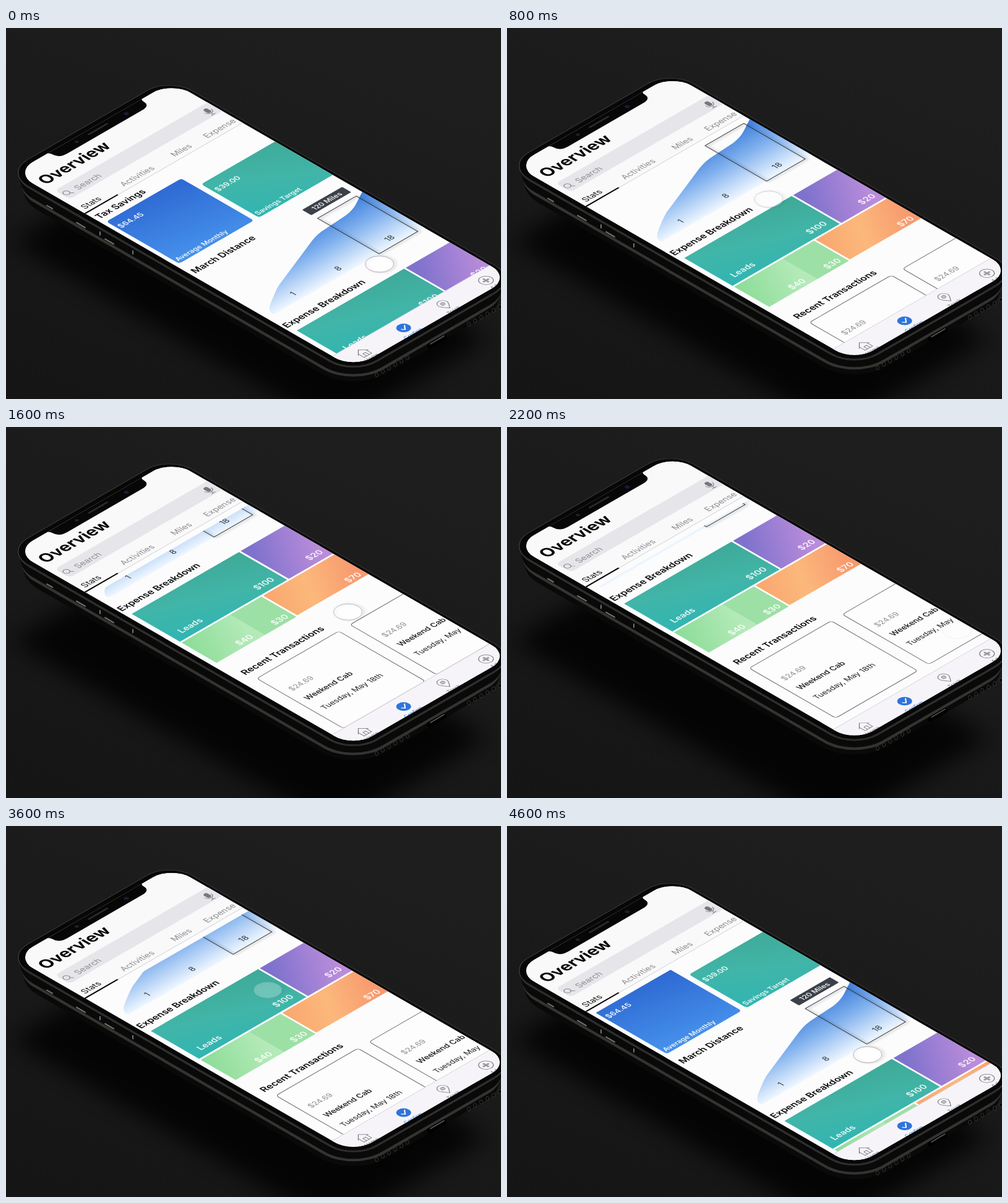
Recreate the animation shown at these times as an HTML page. Size 800 px wide and 600 px high, loop 4700 ms.

```html
<!DOCTYPE html>
<html lang="en">
<head>
<meta charset="utf-8">
<title>Overview screen</title>
<style>
  html, body { margin: 0; width: 100%; height: 100%; overflow: hidden; background: #1b1b1b; }
  svg { display: block; width: 800px; height: 600px; font-family: Inter, "Liberation Sans", sans-serif; }
  .head { font-size: 19.4px; font-weight: 600; fill: #0c0c0e; }
  .tab { font-size: 17.5px; fill: #8b8b90; }
  .money { font-size: 18px; font-weight: 600; fill: #fff; fill-opacity: .9; }
  .card { font-size: 14.8px; font-weight: 600; fill: #fff; fill-opacity: .9; }
  .sum { font-size: 16px; }
  .axis { font-size: 17px; fill: #30343a; text-anchor: middle; }
  .mid { text-anchor: middle; }
  .icon { fill: none; stroke: #77777c; stroke-width: 1.3; stroke-linejoin: round; stroke-linecap: round; }
  .label { font-size: 11px; fill: #66666b; text-anchor: middle; }
</style>
</head>
<body>
<svg viewBox="0 0 800 600">
  <defs>
    <linearGradient id="desk" x1="0" y1="1" x2=".5" y2="0">
      <stop offset="0" stop-color="#151515"/><stop offset=".5" stop-color="#191919"/><stop offset="1" stop-color="#1e1e1e"/>
    </linearGradient>
    <linearGradient id="blue" x1=".6" y1="0" x2=".4" y2="1">
      <stop offset="0" stop-color="#2f6bd4"/><stop offset="1" stop-color="#4590ea"/>
    </linearGradient>
    <linearGradient id="teal" x1="0" y1="1" x2="1" y2="0">
      <stop offset="0" stop-color="#30b5b2"/><stop offset=".5" stop-color="#41b5a8"/><stop offset="1" stop-color="#3fa998"/>
    </linearGradient>
    <linearGradient id="purple" x1="0" y1=".3" x2=".8" y2=".9">
      <stop offset="0" stop-color="#7f72cd"/><stop offset="1" stop-color="#ba8cda"/>
    </linearGradient>
    <linearGradient id="orange" x1="0" y1=".2" x2="1" y2=".5">
      <stop offset="0" stop-color="#f9a870"/><stop offset=".45" stop-color="#fcb87b"/><stop offset="1" stop-color="#f79a6f"/>
    </linearGradient>
    <linearGradient id="green" x1="0" y1="0" x2="1" y2=".4">
      <stop offset="0" stop-color="#8bdc97"/><stop offset="1" stop-color="#b4eab8"/>
    </linearGradient>
    <linearGradient id="area" gradientUnits="userSpaceOnUse" x1="0" y1="462" x2="0" y2="608">
      <stop offset="0" stop-color="#3f7fdc"/><stop offset=".45" stop-color="#82b2ee"/><stop offset="1" stop-color="#eff7ff"/>
    </linearGradient>
    <clipPath id="glass"><rect width="379" height="816" rx="46"/></clipPath>
    <clipPath id="view"><rect y="185" width="379" height="580"/></clipPath>
    <filter id="blur" x="-30%" y="-30%" width="160%" height="160%"><feGaussianBlur stdDeviation="26"/></filter>
    <filter id="soft" x="-30%" y="-30%" width="160%" height="160%"><feGaussianBlur stdDeviation="2.5"/></filter>
    <g id="transaction">
      <rect x="27" y="954" width="197" height="208" rx="6" fill="#fdfdfd" stroke="#77777b" stroke-width="1.6"/>
      <text x="43" y="1023" font-size="16" fill="#8e8e93">$24.69</text>
      <text x="43" y="1061" font-size="16.5" font-weight="500" fill="#111">Weekend Cab</text>
      <text x="43" y="1101" font-size="16.3" fill="#222">Tuesday, May 18th</text>
    </g>
    <g id="grille" fill="#050505" stroke="#3a3a38"></g>
  </defs>

  <rect width="800" height="600" fill="url(#desk)"/>
  <rect transform="matrix(.672 -.388 .672 .388 6 346)" width="375" height="780" rx="50" opacity=".8" filter="url(#blur)"/>

  <g id="phone">
    <g id="body"></g>
    <g id="buttons" stroke="#77766f" stroke-width="2" stroke-linecap="round"></g>
    <use href="#grille" x="599" y="561"/>
    <use href="#grille" x="748" y="479"/>
    <path d="M684 514L708 500" stroke="#000" stroke-width="8" stroke-linecap="round"/>
    <path d="M686 511L708 498" stroke="#5c5b56" stroke-width="1.5" stroke-linecap="round"/>

    <g transform="matrix(.672 -.388 .672 .388 13 234)">
      <rect x="-11" y="-11" width="396" height="838" rx="55" fill="#070707" stroke="#414141" stroke-width="1.3"/>
      <g clip-path="url(#glass)">
        <rect width="379" height="816" fill="#fcfcfd"/>
        <rect width="379" height="171" fill="#f9f9fa"/>
        <path d="M0 171H379" stroke="#c9c9ce"/>
        <path d="M0 170.500H79" stroke="#000" stroke-width="3"/>

        <g clip-path="url(#view)">
          <g id="content">
            <text class="head" x="6" y="200">Tax Savings</text>
            <rect x="9" y="213" width="180" height="175" rx="6" fill="url(#blue)"/>
            <text class="card sum" x="13" y="245">$64.45</text>
            <text class="card" x="13" y="382">Average Monthly</text>
            <rect x="201" y="249" width="200" height="139" rx="6" fill="url(#teal)"/>
            <text class="card sum" x="206" y="285">$39.00</text>
            <text class="card" x="205" y="382">Savings Target</text>

            <text class="head" x="8" y="428.500">March Distance</text>
            <path fill="url(#area)" d="M18 608C14 599 24 589 36 581C52 571 66 562 84 553L212 502Q232 494 250 492L310 488Q330 485 345 477L380 458V608Z"/>
            <rect x="272" y="463" width="93" height="148" fill="none" stroke="#000" stroke-opacity=".16" stroke-width="4" filter="url(#soft)"/>
            <rect x="270" y="460" width="93" height="148" fill="none" stroke="#26282c" stroke-width="1.3"/>
            <rect x="269" y="424" width="96" height="22" rx="2" fill="#3b4149"/>
            <text class="card mid" x="317" y="440.500">120 Miles</text>
            <text class="axis" x="83" y="594">1</text>
            <text class="axis" x="190" y="595">8</text>
            <text class="axis" x="315" y="594">18</text>

            <text class="head" x="4" y="652.500">Expense Breakdown</text>
            <rect x="11" y="669" width="258" height="116" fill="url(#teal)"/>
            <rect x="273" y="669" width="110" height="116" fill="url(#purple)"/>
            <rect x="11" y="789" width="116" height="84" fill="url(#green)"/>
            <rect x="127" y="789" width="76" height="84" fill="#9de0a6"/>
            <rect x="207" y="789" width="176" height="82" fill="url(#orange)"/>
            <g class="money mid">
              <text x="57" y="770">Leads</text>
              <text x="233" y="771">$100</text>
              <text x="353" y="772">$20</text>
              <text x="92" y="865">$40</text>
              <text x="177" y="865">$30</text>
              <text x="353" y="865">$70</text>
            </g>

            <text class="head" x="20" y="933.500">Recent Transactions</text>
            <use href="#transaction"/>
            <use href="#transaction" x="224"/>
          </g>
        </g>

        <text x="13" y="64" font-size="34" font-weight="700" fill="#060607">Overview</text>
        <rect x="12" y="86" width="380" height="36" rx="9" fill="#e6e5ea"/>
        <g class="icon">
          <circle cx="21" cy="105" r="6"/><path d="M25.500 109.500L30 114"/>
        </g>
        <text class="tab" x="41" y="113.500">Search</text>
        <rect x="357" y="96" width="9" height="15" rx="4.500" fill="#77777c"/>
        <path class="icon" d="M353.500 105a8 8 0 0 0 16 0M361.500 113v5M357 118h9"/>
        <text class="tab" x="9" y="161.500" style="fill:#111">Stats</text>
        <text class="tab" x="103" y="161.500">Activities</text>
        <text class="tab" x="226" y="160.500">Miles</text>
        <text class="tab" x="304" y="161">Expense</text>

        <rect y="765" width="379" height="51" fill="#f6f4f9"/>
        <path d="M0 765H379" stroke="#cfced4"/>
        <path class="icon" d="M33 795L45 783L57 795M36 793V806H54V793M42 806V797H48V806"/>
        <circle cx="145" cy="792" r="12.600" fill="#2f74dc"/>
        <path d="M139 792L143.500 797L152 787" fill="none" stroke="#fff" stroke-width="2.200"/>
        <path class="icon" d="M242 806C236 798 232 794 232 789a10 10 0 0 1 20 0C252 794 248 798 242 806Z"/>
        <circle cx="242" cy="789" r="4" fill="#c6c6ca" stroke="#77777c"/>
        <circle class="icon" cx="343" cy="792" r="12.600"/>
        <path d="M336 792H350M343 785V799" stroke="#9a9a9f" stroke-width="4"/>
        <text class="label" x="45" y="819">Home</text>
        <text class="label" x="145" y="819" style="fill:#2f74dc">Confirm</text>
        <text class="label" x="242" y="819">Track</text>
        <text class="label" x="343" y="819">Add</text>

        <path d="M76 -2Q84 0 84 7Q84 24 104 24H284Q304 24 304 7Q304 0 312 -2Z" fill="#070707"/>
        <path d="M170 10H214" stroke="#2b2b2d" stroke-width="4" stroke-linecap="round"/>
        <circle cx="140" cy="11" r="3.500" fill="#22222a"/>
        <circle cx="258" cy="12" r="4.500" fill="#191b33"/>

        <g id="touch">
          <circle cx="2" cy="2" r="24" fill="none" stroke="#000" stroke-opacity=".14" stroke-width="4" filter="url(#soft)"/>
          <circle r="24" fill="#fff" fill-opacity=".75" stroke="#a3a3a8"/>
        </g>
      </g>
    </g>
  </g>
</svg>
<script>
  const LOOP = 4700, STEP = 100;
  const $ = id => document.getElementById(id);
  const add = (parent, tag, attrs) => {
    const el = document.createElementNS('http://www.w3.org/2000/svg', tag);
    for (const k in attrs) el.setAttribute(k, attrs[k]);
    parent.appendChild(el);
  };

  // Phone sides: stacked slices from the underside up, rounder towards the bottom
  const sideColor = z =>
    z < 2 ? '#0b0b0b' : z < 4 ? '#363633' : z < 17 ? '#0a0a0a' : z < 22 ? '#353430' : '#0a0a0a';
  for (let z = 30; z > 0; z--) {
    add($('body'), 'rect', {
      x: -11, y: -11, width: 396, height: 838, rx: 55 + z * .8, fill: sideColor(z),
      transform: `translate(0 ${z}) matrix(.672 -.388 .672 .388 13 234)`
    });
  }
  for (const [x, length] of [[66, 9], [114, 14], [160, 14]]) {
    const y = 287 + (x - 66) * .577;
    add($('buttons'), 'path', { d: `M${x} ${y}l${length} ${length * .577}` });
  }
  for (const x of [152, 205]) {
    add($('buttons'), 'path', { d: `M${x} ${316 + (x - 128) * .577}v5` });
  }
  for (let i = 0; i < 6; i++) {
    add($('grille'), 'ellipse', { cx: i * 10, cy: -i * 5.6, rx: 2.4, ry: 3.3 });
  }

  // time, lift, scroll, touch x, touch y, touch opacity; played forwards, then back
  const KEYS = [
    [0, 0, 0, 249, 630, .95],
    [100, 0, 32, 249, 599, .95],
    [500, -5, 173, 239, 458, .9],
    [800, -11.5, 273, 235, 375, .55],
    [1100, -21.5, 351, 237, 373, .33],
    [1600, -33, 397, 275, 528, .8],
    [1900, -40, 415, 335, 660, .4],
    [2350, -42, 418, 362, 725, 0]
  ];
  const last = KEYS.length - 1;
  const slope = (i, c) => {
    const a = KEYS[Math.max(i - 1, 0)], b = KEYS[Math.min(i + 1, last)];
    return (b[c] - a[c]) / (b[0] - a[0]);
  };

  // Cubic Hermite curve through the keys
  function sample(time, c) {
    let i = 0;
    while (i < last - 1 && time > KEYS[i + 1][0]) i++;
    const a = KEYS[i], b = KEYS[i + 1], span = b[0] - a[0];
    const s = (time - a[0]) / span, r = 1 - s;
    return a[c] * r * r * (1 + 2 * s) + b[c] * s * s * (3 - 2 * s)
      + span * s * r * (slope(i, c) * r - slope(i + 1, c) * s);
  }

  function draw() {
    const t = performance.now() % LOOP;
    const held = t < 2 * STEP ? 0 : Math.floor(t / STEP) * STEP;
    const time = Math.min(held, LOOP - held);
    const [lift, scroll, x, y, alpha] = [1, 2, 3, 4, 5].map(c => sample(time, c));
    $('phone').setAttribute('transform', `translate(0 ${lift})`);
    $('content').setAttribute('transform', `translate(0 ${-scroll})`);
    $('touch').setAttribute('transform', `translate(${x} ${y})`);
    $('touch').setAttribute('opacity', Math.max(0, Math.min(1, alpha)));
    requestAnimationFrame(draw);
  }
  draw();
</script>
</body>
</html>
```
